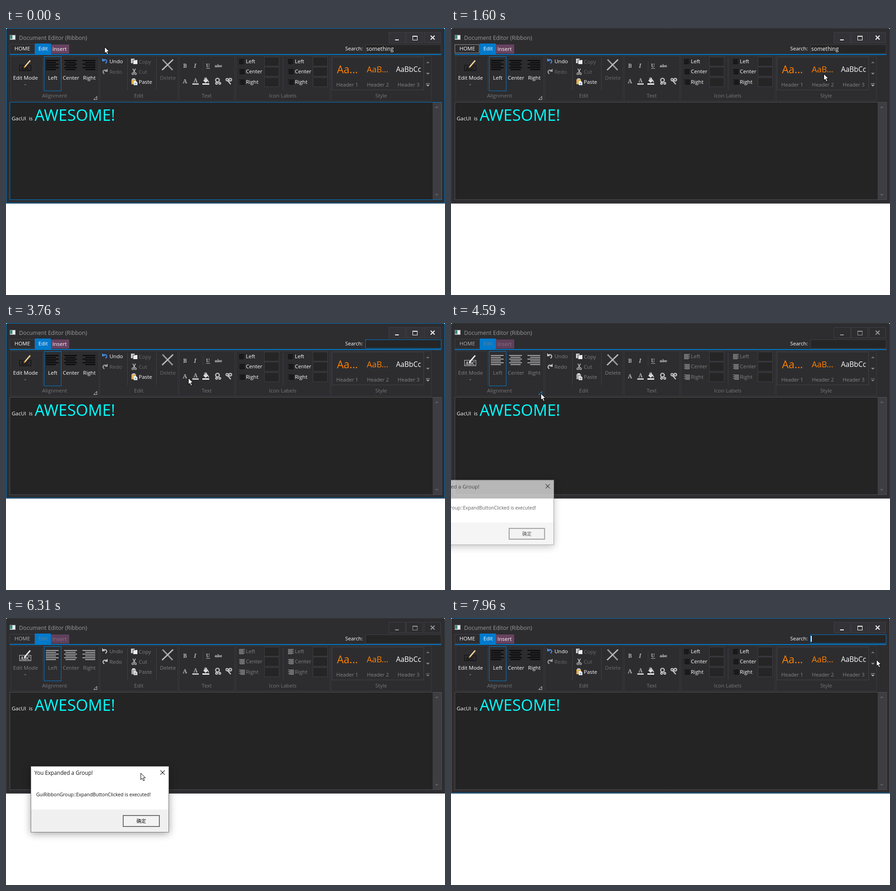
An HTML page with a canvas that plays this animation: 959 px wide and 584 px high, repeating every 8 s.

```html
<!DOCTYPE html>
<html lang="en">
<head>
<meta charset="utf-8">
<title>Document Editor</title>
<style>
html, body { margin: 0; width: 100%; height: 100%; overflow: hidden; background: #fff; }
canvas { display: block; }
</style>
</head>
<body>
<canvas id="stage" width="959" height="584"></canvas>
<script>
const LOOP = 8000;
const ctx = document.getElementById('stage').getContext('2d');
const UI = '"Open Sans", "Noto Sans", sans-serif';
const CJK = '"Noto Sans CJK SC", "Noto Sans CJK", sans-serif';
const SERIF = '"Noto Serif", "Liberation Serif", serif';
const C = {
  win: '#2d2d30', field: '#252526', edge: '#3f3f46', blue: '#007acc', purple: '#68425f',
  white: '#fff', grey: '#999', dim: '#6a6a6c', off: '#808083', icon: '#aaa', black: '#050505'
};

// Cursor stops: time, x, y
const PATH = [
  [90, 215, 41], [230, 231, 140], [330, 222, 192], [470, 110, 112], [620, 33, 47],
  [1210, 33, 47], [1400, 430, 147], [1600, 814, 100], [1740, 814, 100], [2000, 850, 50], [2230, 858, 46],
  [2370, 858, 46], [2540, 798, 46], [2790, 771, 45],
  [3300, 771, 45], [4010, 196, 160], [4050, 196, 160], [4160, 196, 154],
  [4750, 196, 154], [5190, 173, 464], [5220, 173, 464], [5450, 176, 385],
  [5720, 176, 385], [5860, 166, 357], [5960, 166, 357], [6520, 370, 328],
  [6560, 370, 328], [6660, 350, 375], [6810, 376, 421], [6990, 376, 421], [7060, 379, 429],
  [7300, 379, 429], [7760, 884, 182], [7800, 884, 182], [7960, 929, 91]
];
const PRESS_HOME = 780, FOCUS_SEARCH = 2050, CLEAR = 3240, OPEN = 4390, CLOSE = 7160;

const clamp = (v, a = 0, b = 1) => Math.max(a, Math.min(b, v));

function cursorAt(t) {
  const i = PATH.findIndex(p => p[0] > t);
  if (i === 0) return PATH[0].slice(1);
  if (i < 0) return PATH[PATH.length - 1].slice(1);
  const [t0, x0, y0] = PATH[i - 1], [t1, x1, y1] = PATH[i];
  const k = (t - t0) / (t1 - t0);
  return [Math.round(x0 + (x1 - x0) * k), Math.round(y0 + (y1 - y0) * k)];
}

function rect(x, y, w, h, fill) {
  ctx.fillStyle = fill;
  ctx.fillRect(x, y, w, h);
}
function box(x, y, w, h, edge, fill) {
  if (fill) rect(x, y, w, h, fill);
  ctx.strokeStyle = edge;
  ctx.lineWidth = 1;
  ctx.strokeRect(x + .5, y + .5, w - 1, h - 1);
}
function text(s, x, y, color = C.white, size = 11.5, align = 'left', family = UI, style = '500') {
  ctx.font = `${style} ${size}px ${family}`;
  ctx.textAlign = align;
  ctx.fillStyle = color;
  ctx.fillText(s, x, y);
}
const mid = (s, x, y, color, size) => text(s, x, y, color, size, 'center');
function line(color, width, ...pts) {
  ctx.beginPath();
  for (let i = 0; i < pts.length; i += 2) ctx.lineTo(pts[i], pts[i + 1]);
  ctx.strokeStyle = color;
  ctx.lineWidth = width;
  ctx.stroke();
}
function shape(color, ...pts) {
  ctx.beginPath();
  for (let i = 0; i < pts.length; i += 2) ctx.lineTo(pts[i], pts[i + 1]);
  ctx.closePath();
  ctx.fillStyle = color;
  ctx.fill();
}
function ring(x, y, r, color, width, a = 0, b = 2 * Math.PI) {
  ctx.beginPath();
  ctx.arc(x, y, r, a, b);
  ctx.strokeStyle = color;
  ctx.lineWidth = width;
  ctx.stroke();
}
const cross = (x, y, r, color, width) => {
  line(color, width, x - r, y - r, x + r, y + r);
  line(color, width, x + r, y - r, x - r, y + r);
};
const arrowDown = (x, y, r, color) => shape(color, x - r, y, x + r, y, x, y + r);
const arrowUp = (x, y, r, color) => shape(color, x - r, y, x + r, y, x, y - r);

// Rows of alternating length; side is 0 left, .5 centre, 1 right
function alignIcon(x, y, w, step, rows, thick, side, color) {
  for (let i = 0; i < rows; i++) {
    const len = i % 2 ? Math.round(w * .8) : w;
    rect(x + Math.round((w - len) * side), y + i * step, len, thick, color);
  }
}

function undoIcon(x, y, color, flip) {
  ctx.save();
  ctx.translate(x, y);
  if (flip) ctx.scale(-1, 1);
  ring(0, 1, 4, color, 2.2, -2.5, 1.3);
  shape(color, -6, -6, -6, 1, 1, 0);
  ctx.restore();
}

function editIcon(off) {
  const ink = off ? '#d0d0d0' : '#0a0a0a';
  box(29, 81, 26, 13, ink);
  text('ABC', 42, 92, ink, 10, 'center', SERIF, off ? 'bold' : '');
  line(off ? '#ddd' : '#e9c07a', 3, 53, 71, 41, 85);
  line(off ? '#fff' : '#fff0cf', 1, 52, 71, 41, 84);
  shape(off ? '#fff' : '#d88a2c', 39, 88, 40, 83, 43, 86);
}

function clipboardIcons(off) {
  rect(273, 67, 8, 10, '#ccc');
  rect(278, 70, 9, 9, '#eee');
  line(C.win, 1, 277.5, 79, 277.5, 70, 283, 70);
  line('#bbb', 1.6, 277, 89, 282, 98);
  line('#bbb', 1.6, 283, 89, 278, 98);
  ring(277, 100, 1.9, '#bbb', 1.4);
  ring(283, 100, 1.9, '#bbb', 1.4);
  rect(274, 112, 10, 11, off ? '#aaa' : '#e0b050');
  rect(276, 110, 6, 3, off ? '#ddd' : '#b9c3d6');
  shape(off ? '#ddd' : '#eef4ff', 279, 116, 284, 116, 287, 119, 287, 125, 279, 125);
  line(off ? '#888' : '#5b86c4', 1, 281, 120.5, 285, 120.5);
  line(off ? '#888' : '#5b86c4', 1, 281, 122.5, 285, 122.5);
}

function textIcons() {
  const g = '#b4b4b4';
  const letter = (s, x, y, size, style) => text(s, x, y, g, size, 'center', SERIF, style);
  letter('B', 391, 87, 12, 'bold');
  letter('I', 413, 87, 12, 'italic bold');
  rect(430, 72, 1, 22, C.edge);
  letter('U', 441, 86, 11, 'bold');
  rect(437, 88, 9, 1, g);
  letter('abc', 464, 86, 9, 'bold');
  rect(456, 83, 16, 1, g);
  letter('A', 391, 121, 13, 'bold');
  letter('A', 414, 119, 12, 'bold');
  rect(407, 121, 14, 3, '#ccc');
  shape('#ddd', 431, 115, 437, 109, 442, 115, 436, 120);
  ring(436, 111, 2.5, '#bbb', 1.2);
  rect(429, 121, 15, 3, '#eee');
  shape('#bbb', 441, 113, 444, 119, 441, 119);
  ring(462, 114, 4, '#bbb', 2.6);
  ring(460, 121, 2, '#ccc', 2);
  ring(467, 121, 2, '#ccc', 2);
  ring(483, 113, 2.4, '#ccc', 2);
  ring(490, 113, 2.8, '#bbb', 2.4);
  line('#ccc', 2.4, 484, 115, 491, 123);
  line('#bbb', 2, 487, 117, 489, 115);
}

function titleBar(s) {
  box(8, 15, 13, 11, '#888', '#e8eeee');
  rect(9, 16, 5, 8, '#3d8a80');
  text('Document Editor (Ribbon)', 28.5, 26, C.grey, 12.3);
  const ink = s.off ? C.grey : C.white;
  [836, 874, 913].forEach(x => box(x, 9, 37, 24, C.edge, s.off ? C.win : '#333337'));
  rect(850, 25, 8, 2, ink);
  box(888, 17, 11, 10, ink);
  rect(888, 17, 11, 2, ink);
  cross(932, 21, 4.3, ink, 2);
}

function tabs(s) {
  const over = s.hoverHome;
  box(8, 35, 55, 21, over ? '#77777c' : C.edge, over ? '#505054' : C.win);
  if (s.homeFocus) {
    ctx.setLineDash([1, 1]);
    box(8, 36, 54, 19, '#ddd');
    ctx.setLineDash([]);
  }
  rect(63, 34, 35, 23, C.blue);
  rect(98, 36, 40, 20, s.off ? '#5f405b' : C.purple);
  mid('HOME', 35.5, 49, s.off ? '#b0b0b0' : C.white);
  mid('Edit', 81, 49, s.off ? '#6f7f8c' : C.white);
  mid('Insert', 117, 50, s.off ? '#8c7089' : C.white);
  rect(8, 57, 943, 2, C.blue);
}

function search(s) {
  text('Search:', 741, 49, C.white, 11.3);
  box(785, 36, 166, 20, s.searchFocus && !s.off ? C.blue : C.edge, C.field);
  const word = s.t < CLEAR ? 'something' : '';
  ctx.font = `500 12.1px ${UI}`;
  const widthTo = n => ctx.measureText(word.slice(0, n)).width;
  let from = word.length;
  if (word && s.t > 2370) {
    while (from > 0 && widthTo(from - 1) + 787 > s.x - 4) from--;
    rect(787 + widthTo(from), 39, widthTo(word.length) - widthTo(from), 14, C.blue);
  }
  text(word, 787, 50, C.white, 12.1);
  const blink = Math.floor((s.t - 2930) / 480) % 2 === 0;
  if (s.searchFocus && blink) rect(Math.round(786 + widthTo(from)), 39, 2, 13, C.white);
}

function alignmentGroup(s) {
  const ink = s.off ? C.off : C.white;
  const bars = s.off ? C.icon : C.black;
  editIcon(s.off);
  mid('Edit Mode', 42.5, 113, ink);
  arrowDown(42, 123, 2.5, '#777');
  box(83, 62, 38, 76, C.blue);
  ['Left', 'Center', 'Right'].forEach((name, i) => {
    alignIcon(87 + 40 * i, 70, 28, 4, 6, 2, i / 2, bars);
    mid(name, 102 + 40 * i, 113, ink);
  });
  const tip = s.hoverExpand ? '#1c97ea' : '#ccc';
  line(tip, 1, 198.5, 149.5, 198.5, 156.5, 191.5, 156.5, 198.5, 149.5);
}

function editGroup(s) {
  const ink = s.off ? C.off : C.white;
  const dim = s.off ? C.off : C.dim;
  undoIcon(216, 72, s.off ? '#c4c4c4' : '#4a8fe0', false);
  undoIcon(216, 95, s.off ? '#c4c4c4' : '#a4a4a4', true);
  text('Undo', 226, 77, ink);
  text('Redo', 226, 99.5, dim);
  clipboardIcons(s.off);
  text('Copy', 290, 77.5, dim);
  text('Cut', 290, 99.5, dim);
  text('Paste', 290, 122, ink);
  line('#999', 3.2, 342, 69, 364, 92);
  line('#bbb', 3, 365, 69, 341, 92);
  mid('Delete', 353.5, 113, dim);
}

function labelGroup(s) {
  ['Left', 'Center', 'Right'].forEach((name, i) => {
    const y = 63 + Math.round(22.4 * i);
    [509, 616].forEach((x, col) => {
      alignIcon(x, y + 5, 13, 2, 6, 1, i / 2, s.off ? C.icon : C.black);
      text(name, x + 15, y + 14, s.off ? C.off : C.white);
      box(col ? 670 : 564, y, 33, 21, C.edge, C.field);
    });
  });
}

function styleGroup(s) {
  box(712, 63, 201, 73, '#434348');
  text('Aa...', 723, 99, '#ff8000', 23);
  text('AaB...', 788, 97, '#ff8000', 18.2);
  text('AaBbCc', 852, 96, C.white, 15.4);
  [1, 2, 3].forEach(n => mid('Header ' + n, 678.5 + 67 * n, 128, '#858588', 11.2));
  const more = s.off ? '#77777a' : '#aaa';
  arrowUp(921.5, 77, 4, '#6c6c70');
  arrowDown(921.5, 98, 4, '#88888b');
  rect(917, 121, 9, 1, more);
  arrowDown(921.5, 124, 4, more);
}

function ribbon(s) {
  const groups = [[10, 203, 'Alignment'], [205, 376, 'Edit'], [378, 500, 'Text'],
    [502, 708, 'Icon Labels'], [710, 930, 'Style']];
  for (const [a, b, name] of groups) {
    box(a, 61, b - a, 99, '#3a3a3e');
    mid(name, (a + b) / 2 - .5, 152, '#78787b');
  }
  [80, 265, 328, 605].forEach(x => rect(x, 65, 1, 71, C.edge));
  alignmentGroup(s);
  editGroup(s);
  textIcons();
  labelGroup(s);
  styleGroup(s);
}

function documentPane(s) {
  box(8, 162, 944, 214, s.docFocus ? C.blue : '#505055', '#242425');
  rect(932, 163, 19, 212, '#3e3e42');
  arrowUp(941, 175, 4.5, '#58585c');
  arrowDown(941, 363, 4.5, '#58585c');
  text('GacUI\u00a0\u00a0is', 12.5, 201.5, C.white, 11.4);
  text('AWESOME!', 62.5, 202.5, '#00ffff', 34.3);
}

function dialogShadow(w, h) {
  ctx.save();
  ctx.beginPath();
  ctx.rect(-60, -60, w + 120, h + 120);
  ctx.rect(0, 0, w, h);
  ctx.clip('evenodd');
  ctx.shadowColor = 'rgba(0,0,0,.36)';
  ctx.shadowBlur = 16;
  ctx.shadowOffsetY = 3;
  rect(0, 0, w, h, '#fff');
  ctx.restore();
}

function dialog(t) {
  if (t < OPEN + 60 || t > CLOSE + 160) return;
  const alpha = t > CLOSE ? 1 - (t - CLOSE) / 160 : clamp((t - OPEN - 60) / 210);
  const k = .94 + .06 * alpha;
  const [cx, cy] = cursorAt(t);
  const dragging = t > 5960 && t < 6520;
  let x = -74, y = 342;
  if (dragging) { x += cx - 166; y += cy - 357; }
  else if (t >= 6520) { x = 130; y = 313; }
  ctx.save();
  ctx.globalAlpha = alpha;
  ctx.translate(x + 151, y + 72);
  ctx.scale(k, k);
  ctx.translate(-151, -72);
  dialogShadow(302, 145);
  rect(0, 0, 302, 95, '#fff');
  rect(0, 95, 302, 50, '#f0f0f0');
  box(0, 0, 302, 145, '#77777a');
  text('You Expanded a Group!', 8, 18.5, '#111', 11.7);
  cross(288, 14, 4.7, '#111', 1.2);
  text('GuiRibbonGroup::ExpandButtonClicked is executed!', 12, 66, '#111', 10.4);
  const down = t > 7060 && t < CLOSE;
  ctx.lineWidth = 2;
  rect(203, 109, 77, 22, down ? '#ececec' : '#f3f3f3');
  ctx.strokeStyle = '#707070';
  ctx.lineWidth = 2;
  ctx.strokeRect(202, 108, 79, 24);
  text('确定', 241.5, 124, '#111', 10.5, 'center', CJK);
  ctx.restore();
}

function pointer(s) {
  const { x, y } = s;
  const overDoc = y > 170 && x < 930 && y < 376;
  const overSearch = x > 785 && y > 36 && y < 56;
  if (!s.off && s.t < OPEN && (overDoc || overSearch)) {
    for (const [color, w] of [['#000', 3], ['#fff', 1]]) {
      line(color, w, x + .5, y - 6, x + .5, y + 7);
      line(color, w, x - 2, y - 6.5, x + 3, y - 6.5);
      line(color, w, x - 2, y + 7.5, x + 3, y + 7.5);
    }
    return;
  }
  ctx.save();
  ctx.translate(x + .5, y + .5);
  ctx.lineJoin = 'round';
  shape('#fff', 0, 0, 0, 14, 3, 11, 5.5, 16.5, 8, 15.5, 5.5, 10, 10, 10);
  ctx.strokeStyle = '#000';
  ctx.lineWidth = 1;
  ctx.stroke();
  ctx.restore();
}

function draw(t) {
  const [x, y] = cursorAt(t);
  const off = t >= OPEN && t < CLOSE + 60;
  const inside = (a, b, c, d) => x >= a && x < c && y >= b && y < d;
  const s = {
    t, x, y, off,
    active: !off && (t < PRESS_HOME || t >= FOCUS_SEARCH),
    docFocus: t < PRESS_HOME,
    homeFocus: t >= PRESS_HOME && t < FOCUS_SEARCH,
    searchFocus: t >= FOCUS_SEARCH,
    hoverHome: inside(8, 35, 63, 57),
    hoverExpand: inside(190, 148, 201, 159)
  };
  rect(0, 0, 959, 584, '#fff');
  rect(0, 383, 959, 1, C.win);
  ctx.beginPath();
  ctx.roundRect(.5, .5, 958, 382, [3, 3, 0, 0]);
  ctx.fillStyle = C.win;
  ctx.fill();
  ctx.strokeStyle = s.active ? C.blue : '#3a3a3e';
  ctx.lineWidth = 1;
  ctx.stroke();
  titleBar(s);
  tabs(s);
  search(s);
  ribbon(s);
  documentPane(s);
  dialog(t);
  pointer(s);
}

const start = performance.now();
function tick() {
  draw((performance.now() - start) % LOOP);
  requestAnimationFrame(tick);
}
tick();
</script>
</body>
</html>
```
